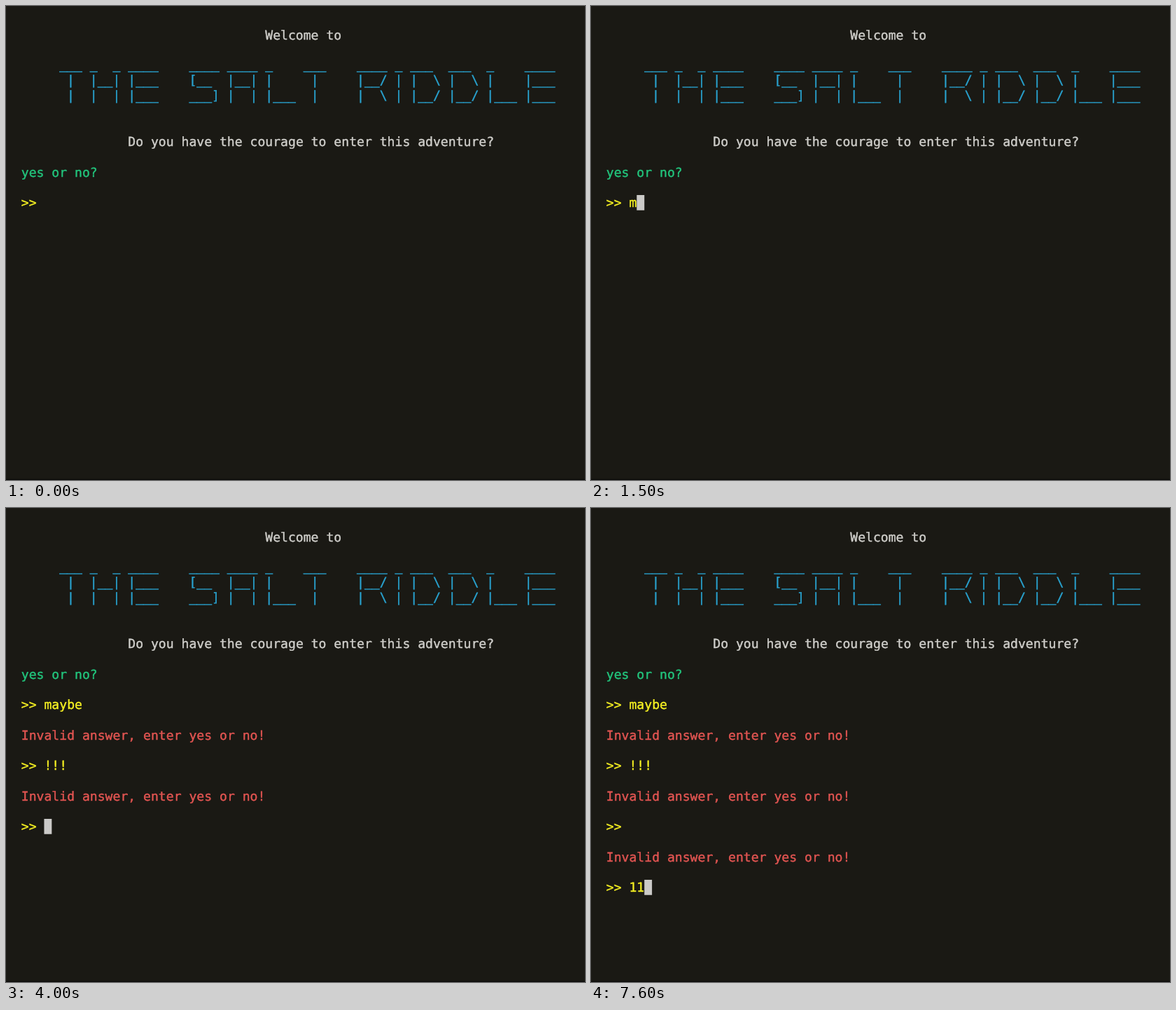
These frames come from a looping animation (827x677 px, 8 s). An HTML page:

```html
<!DOCTYPE html>
<html lang="en">
<head>
<meta charset="utf-8">
<title>Terminal adventure</title>
<style>
  html, body { margin: 0; width: 100%; height: 100%; overflow: hidden; background: #1a1914; }
  svg { display: block; width: 100%; height: 100%; }
  text {
    font: 18.1px "DejaVu Sans Mono", monospace;
    white-space: pre;
    text-rendering: geometricPrecision;
    stroke-width: .4px;
  }
</style>
</head>
<body>
<svg id="stage" viewBox="0 0 827 677">
  <rect width="827" height="677" fill="#1a1914"/>
  <rect y="675.5" width="827" height="1.5" fill="#0c0c0a"/>
  <g id="lines"></g>
  <rect id="caret" width="10.9" height="21.75" fill="#cbcac8"/>
  <path id="pointer" d="M.9 1.8V24.2L5.8 19.7L9.6 28.2L13.4 26.6L9.8 18.2H16.2Z"
        fill="#0b0b0a" stroke="#fff" stroke-width="1.8" stroke-linejoin="round"/>
</svg>
<script>
const LOOP = 8000, STEP = 100;
const CELL = 10.89, ROW = 21.75, TOP = 9, BASE = 17;
const COLOR = { plain: '#d0cfcb', title: '#29a3d0', ask: '#22c47c', input: '#f5f022', error: '#e25552' };

const $ = id => document.getElementById(id);
const rowY = row => TOP + row * ROW;

function addLine(col, row, text, color) {
  const el = document.createElementNS('http://www.w3.org/2000/svg', 'text');
  el.setAttribute('x', col * CELL);
  el.setAttribute('y', rowY(row) + BASE);
  el.setAttribute('fill', COLOR[color]);
  el.setAttribute('stroke', COLOR[color]);
  el.textContent = text;
  $('lines').append(el);
  return el;
}

addLine(34, 1, 'Welcome to', 'plain');
[
  '___ _  _ ____    ____ ____ _    ___    ____ _ ___  ___  _    ____',
  ' |  |__| |___    [__  |__| |     |     |__/ | |  \\ |  \\ |    |___',
  ' |  |  | |___    ___] |  | |___  |     |  \\ | |__/ |__/ |___ |___'
].forEach((art, i) => addLine(7, 2.95 + i, art, 'title'));
addLine(16, 8, 'Do you have the courage to enter this adventure?', 'plain');
addLine(2, 10, 'yes or no?', 'ask');

// Each prompt: time it opens, answer, time of each keystroke
const prompts = [
  { open: 0, answer: 'maybe', keys: [1500, 1600, 1800, 1900, 2000] },
  { open: 2200, answer: '!!!', keys: [3100, 3300, 3400] },
  { open: 3700, answer: '    ', keys: [5000, 5100, 5200, 5200] },
  { open: 5500, answer: '11', keys: [7500, 7600] }
];
prompts.forEach((p, i) => {
  p.row = 12 + 4 * i;
  p.line = addLine(2, p.row, '', 'input');
  if (i) p.error = addLine(2, p.row - 2, 'Invalid answer, enter yes or no!', 'error');
});

// Pointer path: time, x, y
const path = [[100, 250, 506], [400, 70, 307], [900, 76, 340], [1000, 76, 340]];
const CARET_ON = 1000, POINTER_OFF = 1100;

function pointerAt(t) {
  const i = Math.max(1, path.findIndex(p => p[0] >= t));
  const [a, b] = [path[i - 1], path[i]];
  const k = (t - a[0]) / (b[0] - a[0]);
  const e = 1 - (1 - k) ** 2;
  return [a[1] + (b[1] - a[1]) * e, a[2] + (b[2] - a[2]) * e];
}

function show(el, on) {
  el.setAttribute('visibility', on ? 'visible' : 'hidden');
}

function render(ms) {
  const t = Math.floor((ms % LOOP) / STEP) * STEP;
  let current, typed;
  for (const p of prompts) {
    const open = t >= p.open;
    const count = p.keys.filter(k => t >= k).length;
    p.line.textContent = '>> ' + p.answer.slice(0, count);
    show(p.line, open);
    if (p.error) show(p.error, open);
    if (open) [current, typed] = [p, count];
  }
  $('caret').setAttribute('x', (5 + typed) * CELL);
  $('caret').setAttribute('y', rowY(current.row));
  show($('caret'), t >= CARET_ON);

  const moving = t >= path[0][0] && t < POINTER_OFF;
  show($('pointer'), moving);
  if (moving) $('pointer').setAttribute('transform', `translate(${pointerAt(t)})`);
}

const start = performance.now();
function tick() {
  render(performance.now() - start);
  requestAnimationFrame(tick);
}
tick();
</script>
</body>
</html>
```
